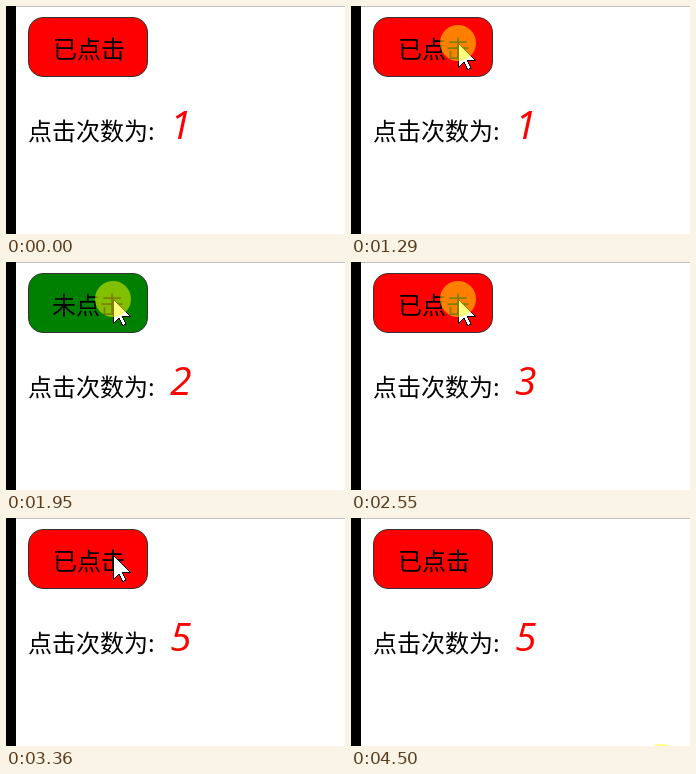
Animation of 339x228 px, one loop 4700 ms. Source, as an HTML page:

```html
<!DOCTYPE html>
<html lang="zh-CN">
<head>
<meta charset="utf-8">
<style>
  html, body { margin: 0; width: 100%; height: 100%; overflow: hidden; background: #fff; }
  svg { display: block; width: 339px; height: 228px; }
  text { font: 24px "Noto Sans CJK SC", "Noto Sans CJK", sans-serif; }
  #count { font: italic 39px "Open Sans", "Noto Sans", sans-serif; fill: #f00; }
</style>
</head>
<body>
<svg viewBox="0 0 339 228">
  <rect x="10" width="329" height="1" fill="#c0c0c0"/>
  <rect width="10" height="228"/>
  <rect id="button" x="22.5" y="11.5" width="119" height="59" rx="14.5" stroke="#333"/>
  <text id="caption" y="52"></text>
  <text x="22" y="133.5">点击次数为:</text>
  <text id="count" x="164" y="133"></text>
  <path id="cursor" d="M.5 .5V24.5L6 19 9.5 26.5 13 25 9.5 17.5H17.5Z" fill="#fff" stroke="#000" shape-rendering="crispEdges"/>
  <circle id="halo" r="18" fill="#ff0" fill-opacity=".5"/>
</svg>
<script>
const LOOP = 4700, STEP = 70;
const HOME = [107, 37], AWAY = [310, 244];
const PRESSES = [1290, 1950, 2550, 3160], HOLD = 200;
const EXIT = [[130, 60], [205, 130], [305, 214]];
const [button, caption, count, cursor, halo] =
  ["button", "caption", "count", "cursor", "halo"].map(id => document.getElementById(id));

function pointerAt(t) {
  if (t < 400) return null;
  if (t < 950) {
    const rest = 1 - Math.floor((t - 400) / STEP) * STEP / 550;
    return [Math.ceil(HOME[0] + 131 * rest ** 3.5), Math.floor(HOME[1] + 145 * rest ** 2.26)];
  }
  if (t < 3760) return HOME;
  return EXIT[Math.floor((t - 3760) / STEP)] || AWAY;
}

function place(el, pos) {
  el.setAttribute("visibility", pos ? "visible" : "hidden");
  if (pos) el.setAttribute("transform", `translate(${pos})`);
}

function draw(t) {
  const clicks = PRESSES.filter(p => t >= p + HOLD).length;
  const on = clicks % 2 === 0;
  button.setAttribute("fill", on ? "#f00" : "#008000");
  caption.setAttribute("x", on ? 47 : 46);
  caption.textContent = on ? "已点击" : "未点击";
  count.textContent = clicks + 1;

  const pos = pointerAt(t);
  const pressed = t >= 4500 || PRESSES.some(p => t >= p && t < p + HOLD);
  place(cursor, pos);
  place(halo, pressed ? pos : null);
}

function frame() {
  draw(performance.now() % LOOP);
  requestAnimationFrame(frame);
}
frame();
</script>
</body>
</html>
```
